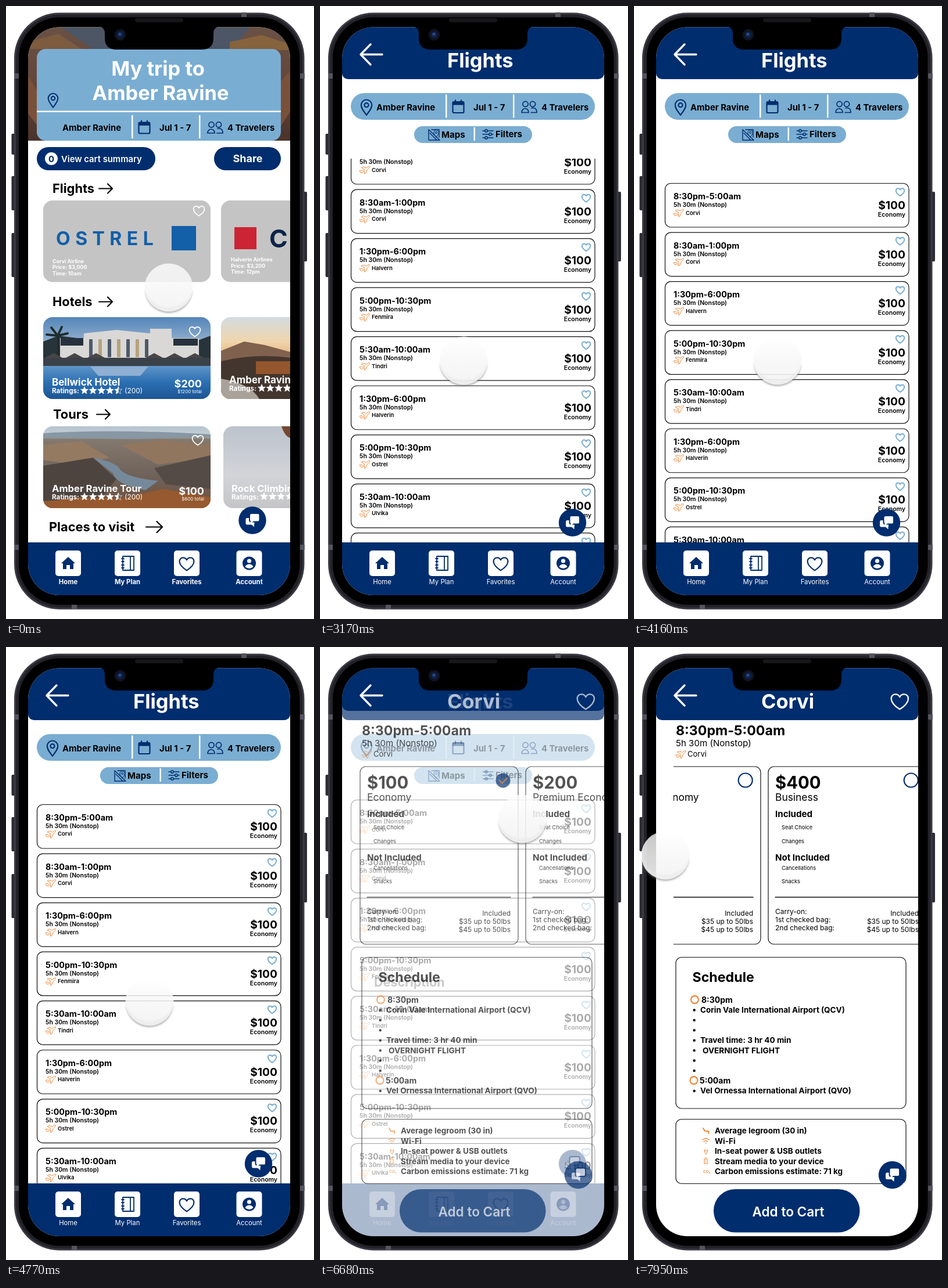
These frames come from a looping animation (530x1056 px, 8000 ms). An HTML page:

```html
<!DOCTYPE html>
<html lang="en">
<head>
<meta charset="utf-8">
<title>Trip planner</title>
<style>
  html, body { margin: 0; width: 100%; height: 100%; overflow: hidden; background: #fff; }
  svg { display: block; width: 100%; height: 100%; font-family: Inter, sans-serif; }
  text { white-space: pre; }
  /* Each shape dissolves on its own, so overlapping shapes blend together. */
  #flightsBody :not(g) { opacity: var(--leaving); }
  #detail :not(g) { opacity: var(--entering); }
</style>
</head>
<body>
<svg id="stage" viewBox="0 0 530 1056"></svg>
<script>
const NAVY = '#002d6e', SKY = '#7aadd2', ORANGE = '#ee8b3e', LOOP = 8000;
const PLACE = 'Amber Ravine', CARRIER = 'Corvi';
const TIMES = ['8:30pm-5:00am', '8:30am-1:00pm', '1:30pm-6:00pm', '5:00pm-10:30pm', '5:30am-10:00am'];
const FLIGHTS = [[0, CARRIER], [1, CARRIER], [2, 'Halvern'], [3, 'Fenmira'], [4, 'Tindri'], [2, 'Halverin'],
  [3, 'Ostrel'], [4, 'Ulvika'], [2, 'Halvern'], [3, 'Fenmira'], [4, 'Tindri'], [2, 'Halverin']];

const text = (s, x, y, size, weight = 700, fill = '#000', anchor = 'start', extra = '') =>
  `<text x="${x}" y="${y}" font-size="${size}" font-weight="${weight}" fill="${fill}" text-anchor="${anchor}" ${extra}>${s}</text>`;
const rect = (x, y, w, h, r, fill, extra = '') =>
  `<rect x="${x}" y="${y}" width="${w}" height="${h}" rx="${r}" fill="${fill}" ${extra}/>`;
const disc = (x, y, r, fill, extra = '') => `<circle cx="${x}" cy="${y}" r="${r}" fill="${fill}" ${extra}/>`;
const line = (d, color, w = 2, fill = 'none') =>
  `<path d="${d}" fill="${fill}" stroke="${color}" stroke-width="${w}" stroke-linecap="round" stroke-linejoin="round"/>`;
const shape = (d, fill) => `<path d="${d}" fill="${fill}"/>`;
const at = (x, y, body, scale = 1) => `<g transform="translate(${x} ${y}) scale(${scale})">${body}</g>`;
const group = (id, body) => `<g id="${id}">${body}</g>`;
const clipped = (id, body) => `<g clip-path="url(#${id})">${body}</g>`;
const clip = (id, body) => `<clipPath id="${id}">${body}</clipPath>`;
const gradient = (id, stops) => `<linearGradient id="${id}" x2="0" y2="1">${stops.map(([o, c, a = 1]) =>
  `<stop offset="${o}" stop-color="${c}" stop-opacity="${a}"/>`).join('')}</linearGradient>`;
const outline = (x, y, w, h) => rect(x, y, w, h, 10, 'none', 'stroke="#111" stroke-width="1.2"');

const heart = (x, y, w, color, stroke) => at(x, y,
  line('M0 9.5C-15 0-11-9-5.5-9C-2.5-9-.8-7.5 0-5.5C.8-7.5 2.5-9 5.5-9C11-9 15 0 0 9.5Z', color, stroke * 21 / w), w / 21);
const arrow = (x, y, w, head) => line(`M${x} ${y}h${w}m${-head} ${-head}l${head} ${head}l${-head} ${head}`, '#000', 2.2);
const plane = (x, y) => at(x, y,
  line('M0 1.5L2.5 1L5 2.5L8.5 0L2.5-3.5L5.5-5L11.5-3Q16-7 17-5.5Q17-3 13 0L10 6.5L8 7L8.5 2.5L5 5H2Z', ORANGE, 1));
const pin = (x, y, k) => at(x, y, line('M0 12C-5 5-8.5 1-8.5-4A8.5 8.5 0 0 1 8.5-4C8.5 1 5 5 0 12Z', NAVY, 2) +
  disc(0, -4, 3.3, 'none', `stroke="${NAVY}" stroke-width="2"`), k);
const calendar = (x, y) => at(x, y, rect(-9.5, -8.5, 19, 19, 2, 'none', `stroke="${NAVY}" stroke-width="2.2"`) +
  rect(-10, -9, 20, 6, 1, NAVY) + line('M-5-11v4M5-11v4', NAVY, 2.4));
const people = (x, y) => at(x, y, line('M-13 10C-13 1-1 1-1 10ZM3 10H13C13 3 9 1 4 2.5', NAVY, 1.7) +
  [-6.5, 6].map(cx => disc(cx, -4.5, 4.6, 'none', `stroke="${NAVY}" stroke-width="1.7"`)).join(''));
const chat = (x, y) => at(x, y, disc(0, 0, 23.7, NAVY) + rect(-11.5, -4, 15, 11.5, 2.5, '#fff') + shape('M-3 6H3V11.5Z', '#fff') +
  rect(-5, -12, 17.5, 14.5, 3, '#fff', `stroke="${NAVY}" stroke-width="2"`) + shape('M-3 0H3L-3 6Z', '#fff'));

const starPoints = Array.from({ length: 11 }, (_, i) => {
  const a = (i * 36 - 90) * Math.PI / 180, r = i % 2 ? 3 : 6.8;
  return `${(r * Math.cos(a)).toFixed(1)},${(r * Math.sin(a)).toFixed(1)}`;
});
const polygon = (points, fill) => `<polygon points="${points.join(' ')}" fill="${fill}" stroke="#fff" stroke-width=".6"/>`;
const stars = (x, y) => [0, 1, 2, 3, 4].map(i => at(x + i * 14.6, y,
  i < 4 ? polygon(starPoints, '#fff') : polygon(starPoints, 'none') + polygon(starPoints.slice(5), '#fff'))).join('');
const rating = (x, y) => text('Ratings:', x, y, 11.7, 700, '#fff') + stars(x + 56, y - 4.5) +
  text('(200)', x + 125, y, 12, 400, '#fff');
const price = (amount, total, x, y) => text(amount, x, y, 18, 700, '#fff', 'end') + text(total, x, y + 9.5, 8, 400, '#fff', 'end');

function tripInfo(y) {
  return text(PLACE, 97, y + 6, 14.8) + text('Jul 1 - 7', 264, y + 6, 14.8) + text('4 Travelers', 381, y + 6, 14.8) +
    calendar(238, y) + people(360, y) + rect(216, y - 21, 2.5, 40, 0, '#fff') + rect(332, y - 21, 2.5, 40, 0, '#fff');
}

function nav(weight) {
  const icons = [
    shape('M-12 0L0-11L12 0H9V10H3V3H-3V10H-9V0Z', NAVY),
    line('M-8-12H11V12H-8ZM5-12V12M-10-8h4M-10-3h4M-10 3h4M-10 8h4', NAVY, 1.8),
    heart(0, 1, 25, NAVY, 2.2),
    disc(0, 0, 11.5, NAVY) + disc(0, -4, 3.6, '#fff') + shape('M-7 6C-5 0 5 0 7 6Q0 12-7 6Z', '#fff')
  ];
  return rect(38, 924, 451, 92, 0, NAVY) + ['Home', 'My Plan', 'Favorites', 'Account'].map((label, i) => {
    const x = [107, 209, 311, 418.5][i];
    return rect(x - 22, 938, 44, 44, 5, '#fff') + at(x, 960, icons[i]) + text(label, x, 996, 11.3, weight, '#fff', 'middle');
  }).join('');
}

function hero() {
  return rect(38, 36, 451, 196, 0, 'url(#rock)') +
    shape('M95 37H420L390 74H150Z', '#4c5665') + shape('M38 62L90 48L130 74H38Z', '#7d5b3e') +
    shape('M385 62L440 50L489 66V76H385Z', '#86623d') + shape('M38 120l15 25v60l-15-20zM473 130l16-18v70l-16 25z', '#7a5138') +
    rect(53, 74, 420, 158, 15, SKY) + rect(53, 180.5, 420, 2.4, 0, '#fff') +
    text('My trip to', 261.5, 120, 34.4, 700, '#fff', 'middle') + text(PLACE, 266, 162, 34.4, 700, '#fff', 'middle') +
    pin(81, 163, .98) + tripInfo(209);
}

function flightTiles() {
  const notes = (x, y, lines) => lines.map((s, i) => text(s, x, y + i * 10.5, 8.9, 700, '#fff')).join('');
  return rect(64, 335, 288, 140.5, 16, '#c4c4c4') + rect(370, 335, 288, 140.5, 16, '#c4c4c4') +
    text('OSTREL', 86, 412, 32, 700, '#135fa8', 'start', 'letter-spacing="8.5"') + rect(285, 379, 42, 42, 0, '#135fa8') +
    heart(332, 353, 19, '#fff', 1.8) + rect(393, 381, 38, 38, 0, '#cc2434') + text('C', 453, 416, 43, 700, '#0c2447') +
    notes(80, 442.5, [CARRIER + ' Airline', 'Price: $3,000', 'Time: 10am']) +
    notes(387, 440, ['Halverin Airlines', 'Price: $3,200', 'Time: 12pm']);
}

function hotelTiles() {
  const windows = Array.from({ length: 7 }, (_, i) => rect(143 + i * 16, 574, 6, 31, 1, i % 2 ? '#b7a27f' : '#4d5a6a')).join('');
  const parasols = [82, 118, 155, 255, 290, 325].map(x => shape(`M${x - 15} 606L${x} 598L${x + 15} 606Z`, '#4a4648')).join('');
  const photos = rect(64, 536, 288, 141, 0, 'url(#dusk)') +
    shape('M64 578L90 568L138 574V618H64ZM325 578L352 568V618H325Z', '#27353a') +
    shape('M93 572H134V564L190 558L248 564V556H285V572H332V614H93Z', '#d9d8d6') + windows +
    rect(94, 572, 39, 13, 0, '#26313d') + rect(288, 573, 42, 12, 0, '#26313d') +
    line('M89 568Q92 590 88 612M89 568L70 566M89 568L78 554M89 568L96 553M89 568L106 564', '#202c2e', 4) +
    rect(64, 606, 288, 14, 0, '#3b4148') + parasols + rect(64, 620, 288, 57, 0, 'url(#pool)') +
    shape('M145 621h100l-14 16h-72z', '#8fb0d2') +
    rect(370, 536, 288, 141, 0, 'url(#sunset)') + shape('M370 594L410 578L445 584L489 596V640H370Z', '#80614e') +
    shape('M370 612Q430 598 489 606V677H370Z', '#43362e') + shape('M430 612h59v22h-59z', '#94562c') +
    shape('M370 642Q420 650 436 677H370Z', '#a9a29b');
  return clipped('hotelClip', photos) +
    heart(325, 561, 19, '#fff', 1.8) + text('Bellwick Hotel', 79, 654, 17, 700, '#fff') + rating(79, 667) +
    price('$200', '$1200 total', 337, 657) + text(PLACE, 384, 650, 17, 700, '#fff') + rating(384, 663);
}

function tourTiles() {
  const photos = rect(64, 724, 288, 141, 0, 'url(#canyon)') +
    shape('M64 736Q180 728 352 738V742L220 746L64 744Z', '#8797a3') +
    shape('M64 756L130 750L178 778L120 790L64 782Z', '#957a62') + shape('M196 756L270 748L352 756V778L262 790Z', '#91765f') +
    shape('M64 792L150 778L190 815L160 852H64Z', '#4d443f') + shape('M255 796L352 774V832L275 824Z', '#544b47') +
    shape('M150 778Q190 786 196 798Q206 812 262 818L240 834Q190 825 184 805Z', '#76899a') +
    shape('M64 854L130 846L200 848L270 832L352 846V865H64Z', '#97592f');
  return clipped('tourClip', photos + rect(374, 724, 288, 141, 0, 'url(#mist)') + shape('M474 724H489V744Q480 742 474 724Z', '#74492f')) +
    heart(330, 748, 19, '#fff', 1.8) + text(PLACE + ' Tour', 79, 837, 16.6, 700, '#fff') + rating(79, 850) +
    price('$100', '$600 total', 341, 842) + text('Rock Climbing', 388, 837, 16.6, 700, '#fff') + rating(388, 849.5);
}

function homePage() {
  const heading = (s, x, y, ax, w = 23, head = 8) => text(s, x, y, 21.8) + arrow(ax, y - 7.5, w, head);
  return hero() + rect(53, 243, 204, 40, 20, NAVY) + disc(78, 263, 11, '#fff') +
    text('0', 78, 268.5, 15, 700, NAVY, 'middle') + text('View cart summary', 95, 268.5, 14.8, 600, '#fff') +
    rect(358, 243, 115, 40, 20, NAVY) + text('Share', 416, 269, 18, 700, '#fff', 'middle') +
    heading('Flights', 80, 322, 160) + heading('Hotels', 80, 517, 160) + heading('Tours', 81, 711, 156) +
    heading('Places to visit', 74, 905, 241, 28, 9.5) + flightTiles() + hotelTiles() + tourTiles() + chat(424, 886) + nav(700);
}

function flightCard([time, airline], i) {
  return at(0, 263.5 + i * 84.55, outline(53.5, 0, 419.5, 75.5) + text(TIMES[time], 68, 27.5, 14.3) +
    text('5h 30m (Nonstop)', 68, 40.5, 10.5, 600) + plane(68.5, 50.5) + text(airline, 89, 54, 9.5, 600) +
    heart(458, 15, 14.5, SKY, 2) + text('$100', 467, 44.5, 19.2, 700, '#000', 'end') +
    text('Economy', 467, 57.5, 10.5, 600, '#000', 'end'));
}

function flightsPage() {
  const mapIcon = line('M187 231V213L206 231ZM192 213H205V226M189 219L201 231', NAVY, 1.4) + pin(200, 220, .5);
  const filterIcon = line('M280 215H298M280 221H298M280 227H298', NAVY, 1.5) +
    [[286, 215], [293, 221], [286, 227]].map(([x, y]) => disc(x, y, 2.2, SKY, `stroke="${NAVY}" stroke-width="1.5"`)).join('');
  return text('Flights', 219, 106, 34.4, 700, '#fff') + rect(53, 150, 420, 46, 23, SKY) + pin(80, 175, 1.08) + tripInfo(173.5) +
    rect(162, 207, 203, 29, 14.5, SKY) + rect(264.5, 209, 2.4, 23, 0, '#fff') + mapIcon + filterIcon +
    text('Maps', 209, 227, 15) + text('Filters', 302, 226, 15) +
    clipped('listClip', group('list', FLIGHTS.map(flightCard).join(''))) + chat(434.5, 890) + nav(400);
}

function fareCard([amount, name], i) {
  const small = (s, y) => text(s, 23, y, 9.3, 400);
  const right = (s, y) => text(s, 259, y, 12, 400, '#000', 'end');
  const mark = i ? disc(245.7, 229.5, 12, 'none', `stroke="${NAVY}" stroke-width="2.2"`)
    : disc(246, 230, 12.5, NAVY) + line('M240 230l4.5 5l8-9', ORANGE, 2.6);
  return at(69 + i * 285, 0, outline(0, 206, 272, 306) + text(amount, 12, 244, 29.3) + text(name, 12, 265, 17.4, 400) + mark +
    text('Included', 12, 292.5, 15.1) + small('Seat Choice', 314) + small('Changes', 338) +
    text('Not Included', 12, 368, 15.1) + small('Cancellations', 384) + small('Snacks', 407) + line('M12 431H259', '#111', 1.3) +
    ['Carry-on:', '1st checked bag:', '2nd checked bag:'].map((s, n) => text(s, 12, 460 + n * 14, 12, 400)).join('') +
    right('Included', 463) + right('$35 up to 50lbs', 477) + right('$45 up to 50lbs', 491));
}

function detailPage() {
  const ring = (x, y) => disc(x, y, 6.5, 'none', `stroke="${ORANGE}" stroke-width="2.3"`);
  const bullets = [0, 1, 2, 3, 4, 5, 6, 8].map(i => disc(103.7, 625.5 + i * 17.4, 2.2, '#000')).join('');
  const amenities = ['Average legroom (30 in)', 'Wi-Fi', 'In-seat power &amp; USB outlets', 'Stream media to your device',
    'Carbon emissions estimate: 71 kg'].map((s, i) => text(s, 139, 838 + i * 17.5, 13.5)).join('');
  const icons = line('M119 829l3 5h6v4', ORANGE, 2) + line('M118 849q5.5-5 11 0M120 852q3.5-3 7 0M123 854.5h1', ORANGE, 1.3) +
    line('M122 865v3M126 865v3M121 868h6q0 4-3 4t-3-4M124 872v2', ORANGE, 1) + line('M121 882h5v8h-5ZM122 880h3', ORANGE, 1.2) +
    text('CO₂', 119, 906, 6.5, 600, ORANGE);
  return rect(38, 10, 451, 116, 10, NAVY) + text(CARRIER, 219, 106, 34.4, 700, '#fff') + heart(457.3, 94, 29.5, '#fff', 2.3) +
    text(TIMES[0], 72, 151.5, 23.2) + text('5h 30m (Nonstop)', 72, 171, 15.1, 400) + plane(72, 184.5) + text(CARRIER, 92, 189, 13, 400) +
    clipped('fareClip', group('fares', [['$100', 'Economy'], ['$200', 'Premium Economy'], ['$400', 'Business']].map(fareCard).join(''))) +
    outline(72, 534.5, 396, 260.5) + text('Schedule', 100.5, 577, 23.2) + ring(104.5, 607.5) + text('8:30pm', 116, 613, 14) + bullets +
    text('Corin Vale International Airport (QCV)', 114, 630, 13.5) + text('Travel time: 3 hr 40 min', 114, 682, 13.6) +
    text('OVERNIGHT FLIGHT', 118, 699.5, 13.6) + ring(103, 746.5) + text('5:00am', 113, 752, 14) +
    text('Vel Ornessa International Airport (QVO)', 114, 769, 13.5) +
    outline(72, 813.5, 396, 111) + icons + amenities + chat(444.5, 909.5) +
    rect(137, 934, 251.5, 74.5, 37, NAVY) + text('Add to Cart', 265.5, 980.5, 22.6, 600, '#fff', 'middle');
}

function phone() {
  const side = (x, y, h) => rect(x, y, 7, h, 2, '#2c2c34');
  const band = (x, y, w, h) => rect(x, y, w, h, 0, '#555560');
  return side(9.5, 220, 36) + side(9.5, 293, 59) + side(9.5, 391, 76) + side(511, 320, 120) +
    rect(14, 11.5, 499.5, 1028, 78, '#3a3a44') + rect(17, 14.5, 493.5, 1022, 75, '#222228') +
    band(14, 116, 8, 9) + band(506, 116, 8, 9) + band(14, 928, 8, 9) + band(506, 928, 8, 9) + band(405, 11, 9, 8) + band(113, 1031, 9, 8) +
    rect(22, 19.5, 483.5, 1012, 70, '#000') + rect(222, 21, 83, 7, 3.5, '#17171a') + rect(38, 36.5, 451, 978.5, 54, '#fff');
}

function notch() {
  return shape('M160 35Q170 37 170 47V55Q170 75 190 75H337Q357 75 357 55V47Q357 37 367 35Z', '#000') +
    disc(196.5, 49.5, 10, '#10131f') + disc(196.5, 49.5, 6, '#101f45') + disc(196, 48.5, 2.6, '#27498a');
}

document.getElementById('stage').innerHTML = '<defs>' +
  clip('screen', rect(38, 36.5, 451, 978.5, 54, '#000')) + clip('listClip', rect(50, 263, 426, 661, 0, '#000')) +
  clip('fareClip', rect(68, 200, 421, 320, 0, '#000')) +
  clip('hotelClip', rect(64, 536, 288, 141, 16, '#000') + rect(370, 536, 288, 141, 16, '#000')) +
  clip('tourClip', rect(64, 724, 288, 141, 16, '#000') + rect(374, 724, 288, 141, 16, '#000')) +
  gradient('rock', [[0, '#6a5145'], [.5, '#64453a'], [1, '#4a332c']]) + gradient('dusk', [[0, '#5485b9'], [.5, '#b9cadb']]) +
  gradient('pool', [[0, '#5e95c8'], [.5, '#2b6fb3'], [1, '#1d5493']]) +
  gradient('canyon', [[0, '#b4c4d1'], [.1, '#c3cdd3'], [.16, '#84796f'], [.6, '#6f625a'], [1, '#70503d']]) +
  gradient('sunset', [[0, '#d3dbe0'], [.3, '#f0d5ac'], [.5, '#e5b07d']]) + gradient('mist', [[0, '#bcc3cd'], [.6, '#d2d4d8'], [1, '#c5c5c7']]) +
  gradient('touch', [[0, '#fff', .78], [.5, '#f7f7f7', .86], [1, '#f3f3f3', .92]]) +
  '<filter id="soft" x="-20%" y="-20%" width="140%" height="140%"><feGaussianBlur stdDeviation="1.8"/></filter></defs>' +
  phone() + clipped('screen', group('home', homePage()) +
    group('flights', rect(38, 10, 451, 116, 10, NAVY, 'id="header"') + group('flightsBody', flightsPage())) +
    group('ghost', text('Description', 93, 585, 21.5, 700, '#555')) + group('detail', detailPage()) +
    group('back', line('M107 83.5H70.5M87 66L70 83.5L87 101', '#fff', 3.4))) + notch() +
  group('cursor', '<path d="M-41 3A41 41 0 0 0 41 3A42 39 0 0 1-41 3Z" fill="#777" opacity=".55" filter="url(#soft)"/>' +
    disc(0, 0, 41.5, 'url(#touch)'));

const stage = document.getElementById('stage');
const el = Object.fromEntries(['home', 'flights', 'header', 'list', 'ghost', 'detail', 'fares', 'back', 'cursor']
  .map(id => [id, document.getElementById(id)]));

// Each key is [time, ...values]; two keys at one time make a hard step.
const CURSOR = [[0, 280, 485], [430, 280, 485], [1090, 168, 319], [1200, 168, 319], [1260, 172, 320], [2450, 172, 320],
  [2760, 247, 611], [4960, 247, 611], [5230, 353, 323], [5430, 353, 323], [5550, 348, 296], [6940, 348, 296],
  [7140, 395, 358], [7440, 395, 358], [7790, 60, 358], [7950, 54, 359]];
const SCROLL = [[0, 0], [3170, 0], [3170, -32], [3330, -32], [3700, -210], [3780, -210], [4160, 42], [4220, 42], [4930, 3], [5230, 0]];
const SWIPE = [[0, 0], [7440, 0], [7800, -408]];

function sample(keys, t) {
  const i = keys.findLastIndex(k => k[0] <= t), a = keys[i], b = keys[i + 1];
  if (!b) return a.slice(1);
  const u = (t - a[0]) / (b[0] - a[0]), e = u * u * (3 - 2 * u);
  return a.slice(1).map((v, n) => v + (b[n + 1] - v) * e);
}
const show = (node, visible) => node.setAttribute('display', visible ? 'inline' : 'none');
const move = (node, x, y) => node.setAttribute('transform', `translate(${x} ${y})`);

function draw(t) {
  const u = Math.min(1, Math.max(0, (t - 6350) / 750));
  const fade = 1 - (1 - u) ** 1.9;
  show(el.home, t < 1670);
  show(el.flights, t >= 1670 && fade < 1);
  show(el.back, t >= 1670);
  show(el.detail, fade > 0);
  stage.style.setProperty('--leaving', 1 - fade);
  stage.style.setProperty('--entering', fade);
  el.ghost.setAttribute('opacity', fade * (1 - fade) * 1.4);
  el.header.setAttribute('height', 116 - 24 * fade);
  move(el.list, 0, sample(SCROLL, t)[0]);
  move(el.fares, sample(SWIPE, t)[0], 0);
  move(el.cursor, ...sample(CURSOR, t));
}

const start = performance.now();
function tick() {
  draw((performance.now() - start) % LOOP);
  requestAnimationFrame(tick);
}
tick();
</script>
</body>
</html>
```
